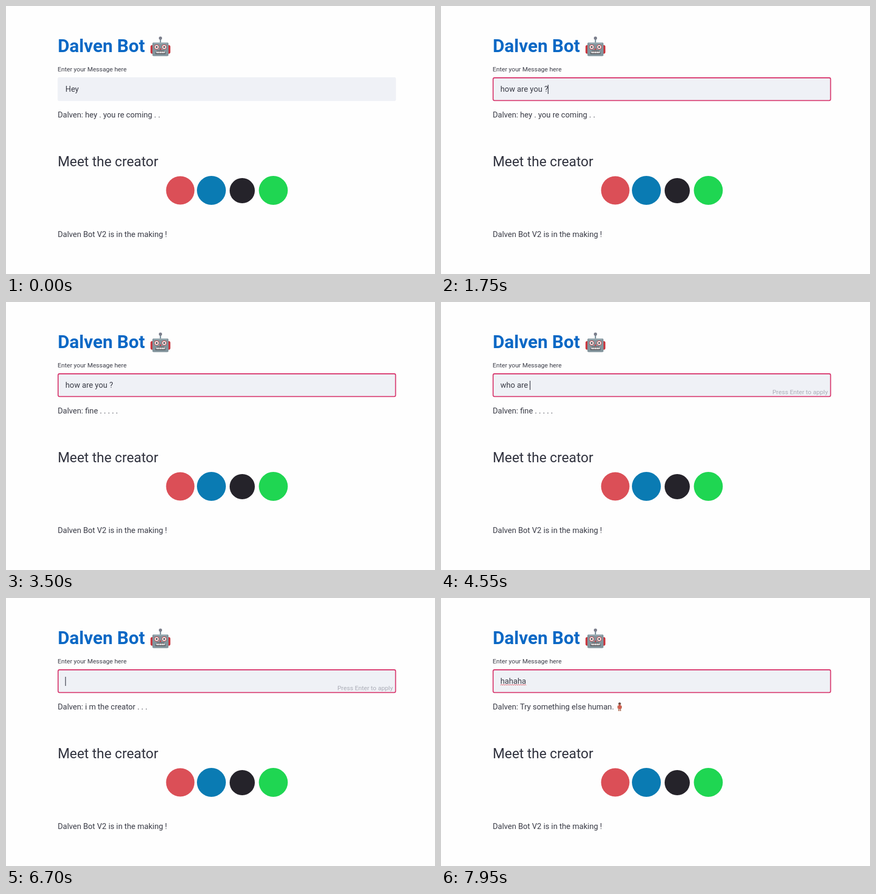
An HTML page that plays this animation: 800x500 px, repeating every 8 s.

```html
<!DOCTYPE html>
<html lang="en">
<head>
<meta charset="utf-8">
<title>Chat bot</title>
<style>
  html, body { margin: 0; width: 100%; height: 100%; overflow: hidden; background: #fefefe; }
  svg { display: block; width: 800px; height: 500px; }
  text { font: 14.6px Roboto, "Open Sans", sans-serif; fill: #3a3c47; white-space: pre; }
  .title { font-size: 33.6px; font-weight: 700; fill: #0a68c5; }
  .small { font-size: 11.7px; }
  .heading { font-size: 25.6px; fill: #31333f; }
  .hint { fill: #abadb7; text-anchor: end; }
</style>
</head>
<body>
<svg viewBox="0 0 800 500">
  <text class="title" x="96.5" y="86">Dalven Bot</text>

  <g id="robot">
    <path d="M288 61V70" stroke="#78909c" stroke-width="2.4"/>
    <circle cx="288" cy="60" r="3" fill="#7b7f8c"/>
    <rect x="269.5" y="73" width="37" height="16" rx="3" fill="#c9343c"/>
    <rect x="273" y="68" width="30" height="25.5" rx="2.5" fill="#82949c"/>
    <rect x="275" y="68" width="26" height="2.5" rx="1.2" fill="#9aabb2"/>
    <g fill="#f7f3f2" stroke="#c0555a" stroke-width="1.2">
      <circle cx="281" cy="76.5" r="4.2"/>
      <circle cx="295" cy="76.5" r="4.2"/>
    </g>
    <g fill="#4a4449">
      <circle cx="281" cy="76.5" r="1.7"/>
      <circle cx="295" cy="76.5" r="1.7"/>
      <path d="M281 83.5H295L297.5 89.5H278.5Z"/>
    </g>
    <path d="M288 78.5l2 3.5h-4z" fill="#c9343c"/>
    <path d="M280.5 86.5H296" stroke="#f4f4f4" stroke-width="3.6" stroke-dasharray="2.5 .7"/>
  </g>

  <text class="small" x="96.3" y="122">Enter your Message here</text>
  <rect x="96.3" y="133" width="630.9" height="44.2" rx="3" fill="#eff1f6"/>
  <rect id="focus" x="97.2" y="134" width="629.3" height="42.3" rx="2.5" fill="none" stroke="#d8346b" stroke-width="1.8"/>
  <rect id="selection" x="110.8" y="146" height="18" fill="#d33843"/>
  <text id="value" x="110.8" y="160"></text>
  <path id="squiggle" fill="none" stroke="#e0525c" stroke-width="1"/>
  <rect id="caret" y="147" width="1.2" height="17" fill="#31333f"/>
  <text id="hint" class="small hint" x="721.5" y="172">Press Enter to apply</text>

  <text id="reply" x="96.5" y="208"></text>
  <g id="person">
    <path d="M-1.5 9V15.5M1.5 9V15.5" stroke="#a9664a" stroke-width="1.8"/>
    <path d="M-3.3 5.5V10.5M3.3 5.5V10.5" stroke="#a9664a" stroke-width="1.4"/>
    <rect x="-2.7" y="4.5" width="5.4" height="7" rx="1.2" fill="#d65a4c"/>
    <circle cy="2" r="2.4" fill="#4a3432"/>
    <circle cy="2.6" r="1.6" fill="#a9664a"/>
  </g>

  <text class="heading" x="96.5" y="299">Meet the creator</text>
  <circle cx="325" cy="344" r="26.5" fill="#db4f57"/>
  <circle cx="383" cy="344" r="27" fill="#0a7bb3"/>
  <circle cx="440.5" cy="344.5" r="23.5" fill="#25232a"/>
  <circle cx="498.5" cy="344" r="27" fill="#1fd652"/>
  <text x="96.5" y="430.5">Dalven Bot V2 is in the making !</text>

  <g id="pointer" fill="none">
    <path id="beam" d="M-3-7.5Q0-7.5 0-6Q0-7.5 3-7.5M0-6V6M-3 7.5Q0 7.5 0 6Q0 7.5 3 7.5" stroke="#55565e" stroke-width="1.1"/>
    <path id="arrow" d="M0 0V14L3.3 11L5.6 16L7.8 15L5.6 10.2H10Z" fill="#222" stroke="#fff"/>
  </g>
</svg>
<script>
const LOOP = 8000, KEY = 50, BLINK = 500, LEFT = 110.8;
const el = Object.fromEntries([...document.querySelectorAll('[id]')].map(e => [e.id, e]));

const steps = [{ at: 0, value: 'Hey', reply: 'hey . you re coming . .', blinkFrom: 0 }];
const last = () => steps[steps.length - 1];
const step = (at, change) => steps.push({ ...last(), at, ...change });
const act = (at, change) => step(at, { blinkFrom: at, ...change });
const type = (at, text) => [...text].forEach((char, i) => {
  const before = last().selected ? '' : last().value;
  act(at + i * KEY, { value: before + char, selected: false, hint: true });
});
const enter = (at, change) => act(at, { hint: false, ...change });

act(400, { focus: true });
act(600, { selected: true });
type(950, 'how are you ?');
enter(1650);
step(2300, { reply: 'fine . . . . .' });
act(3650, { selected: true });
type(4150, 'who are ');
type(4650, 'you');
type(4900, ' ?');
enter(5000);
step(5400, { reply: 'i m the creator . . .' });
act(6150, { selected: true });
act(6400, { value: '', selected: false, hint: true });
type(6850, 'hahaha');
enter(7250, { misspelt: true });
step(7700, { reply: 'Try something else human. ', person: true });

// Pointer enters at the right, settles in the field and hides on typing.
const pointer = { from: [768, 186], to: [586.5, 164.5], start: 50, end: 450, hide: 950 };

const show = (e, on) => e.setAttribute('visibility', on ? 'visible' : 'hidden');

function drawPointer(t) {
  const { from, to, start, end, hide } = pointer;
  const p = Math.min(1, Math.max(0, (t - start) / (end - start)));
  const eased = 1 - (1 - p) ** 2;
  const [x, y] = from.map((v, i) => v + (to[i] - v) * eased);
  const visible = t >= start && t < hide;
  const inField = x < 727 && y < 177;
  el.pointer.setAttribute('transform', `translate(${x} ${y})`);
  show(el.beam, visible && inField);
  show(el.arrow, visible && !inField);
}

function draw(t) {
  const s = steps.findLast(item => item.at <= t);
  el.value.textContent = s.value;
  el.reply.textContent = 'Dalven: ' + s.reply;
  const width = s.value ? el.value.getComputedTextLength() : 0;

  show(el.focus, s.focus);
  show(el.hint, s.hint);
  show(el.selection, s.selected);
  el.selection.setAttribute('width', width);
  el.value.style.fill = s.selected ? '#fff' : '';

  el.caret.setAttribute('x', LEFT + width - 0.4);
  show(el.caret, s.focus && !s.selected && (t - s.blinkFrom) % (2 * BLINK) < BLINK);

  show(el.squiggle, s.misspelt);
  el.squiggle.setAttribute('d', `M${LEFT} 163` + 'l2-2l2 2'.repeat(Math.round(width / 4)));

  show(el.person, s.person);
  el.person.setAttribute('transform', `translate(${103.5 + el.reply.getComputedTextLength()} 195.5)`);
  drawPointer(t);
}

const begin = performance.now();
function tick() {
  draw((performance.now() - begin) % LOOP);
  requestAnimationFrame(tick);
}
tick();
</script>
</body>
</html>
```
